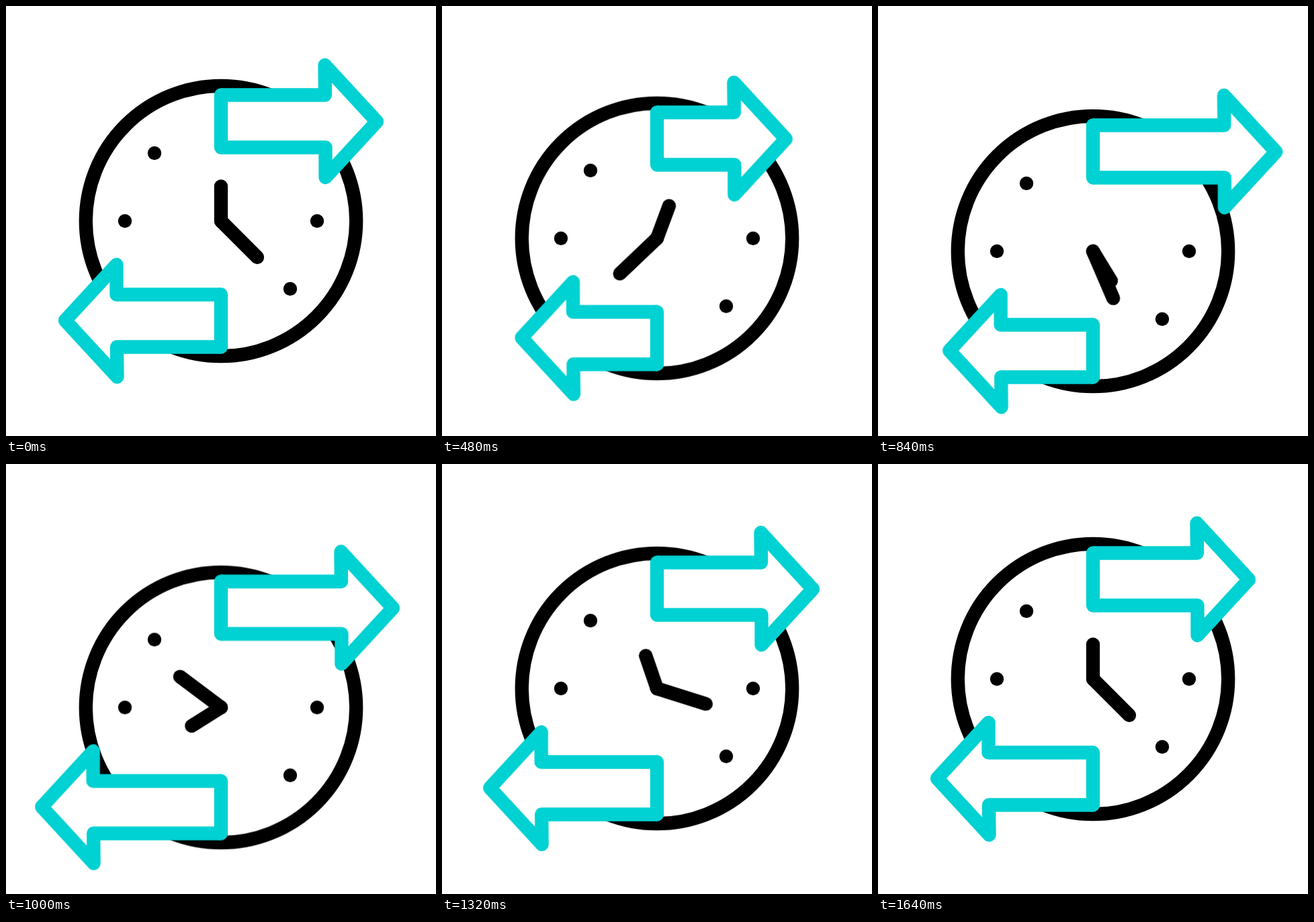
Animation of 640x640 px, one loop 1680 ms. Source, as an HTML page:

```html
<!DOCTYPE html>
<html lang="en">
<head>
<meta charset="utf-8">
<title>Clock with arrows</title>
<style>
  html, body { margin: 0; width: 100%; height: 100%; overflow: hidden; background: #fff; }
  svg { display: block; width: 100%; height: 100%; }

  .ink, .arrow path { stroke-width: 20.3; stroke-linecap: round; stroke-linejoin: round; }
  .ink { fill: none; stroke: #000; }
  .arrow path { fill: #fff; stroke: #00d1d2; }

  .icon, .head, .hand { animation: 1680ms cubic-bezier(.5, 0, .5, 1) infinite; }
  .hand { transform-origin: 320px 320px; }
  .icon { animation-name: bob; }
  .right .head { animation-name: right; }
  .left .head { animation-name: left; }
  .hour { animation-name: hour; animation-timing-function: cubic-bezier(.55, 0, .45, 1); }
  .minute { animation-name: minute; animation-timing-function: cubic-bezier(.556, 0, .474, 1); }

  @keyframes bob {
    0%, 3.33%, 97.62%, 100% { transform: translateY(0); }
    50.48% { transform: translateY(45px); }
  }
  @keyframes right {
    0%, 74.11%, 100% { transform: translateX(0); }
    22.02% { transform: translateX(-51px); }
    47.32% { transform: translateX(41px); }
  }
  @keyframes left {
    0%, 15.48%, 90.77%, 100% { transform: translateX(0); }
    39.4% { transform: translateX(-51px); }
    64.29% { transform: translateX(40px); }
  }
  @keyframes hour {
    0%, 11.9% { transform: rotate(0deg); }
    94.82%, 100% { transform: rotate(360deg); }
  }
  @keyframes minute {
    0%, 2.08% { transform: rotate(0deg); }
    93.45%, 100% { transform: rotate(720deg); }
  }
</style>
</head>
<body>
<svg viewBox="0 0 640 640">
  <defs>
    <clipPath id="shaft"><rect x="320" y="0" width="400" height="400"/></clipPath>
    <path id="head" d="M200 132.5H475L474.5 88L552 172L475.5 255V210.5H200"/>
    <path id="tail" d="M320 132.5V210.5"/>
  </defs>
  <g class="icon">
    <circle class="ink" cx="320" cy="320" r="201.2"/>
    <g>
      <circle cx="221" cy="219" r="10.2"/>
      <circle cx="177" cy="320" r="10.2"/>
      <circle cx="463" cy="320" r="10.2"/>
      <circle cx="423" cy="421" r="10.2"/>
    </g>
    <path class="ink hand hour" d="M320 320V268.5"/>
    <path class="ink hand minute" d="M320 320L374 374"/>
    <g class="arrow right">
      <g clip-path="url(#shaft)">
        <g class="head"><path d="M200 132.5H475L474.5 88L552 172L475.5 255V210.5H200"/></g>
      </g>
      <path d="M320 132.5V210.5"/>
    </g>
    <g class="arrow left" transform="rotate(180 320 320)">
      <g clip-path="url(#shaft)">
        <g class="head"><path d="M200 132.5H475L474.5 88L552 172L475.5 255V210.5H200"/></g>
      </g>
      <path d="M320 132.5V210.5"/>
    </g>
  </g>
</svg>
</body>
</html>
```
